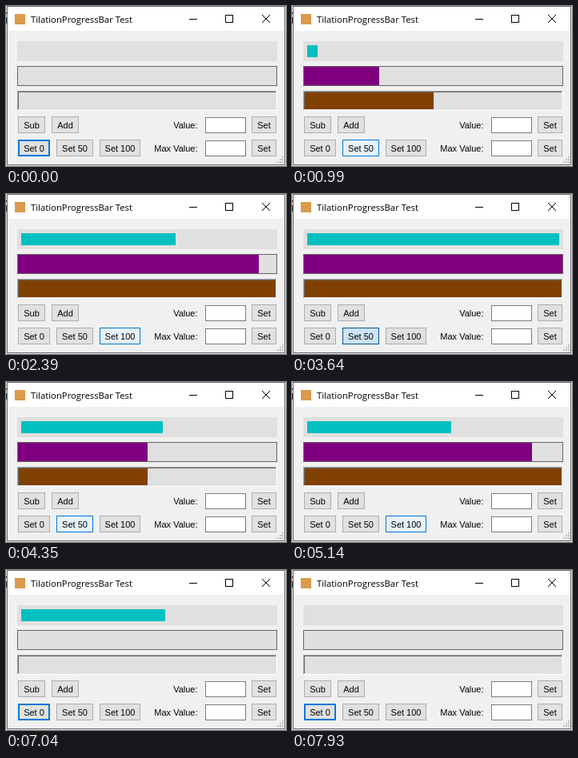
An HTML page with a canvas for the animation above (8.21 s loop, 350 px wide and 200 px high).

```html
<!DOCTYPE html>
<html lang="en">
<head>
<meta charset="utf-8">
<title>TilationProgressBar Test</title>
<style>
html, body { margin: 0; width: 100%; height: 100%; overflow: hidden; }
canvas { display: block; }
</style>
</head>
<body>
<canvas id="stage" width="350" height="200"></canvas>
<script>
const c = document.getElementById('stage').getContext('2d', { alpha: false });
const LOOP = 8210, TICK = 15.6, LAG = 8;
const UI = '11px "Liberation Sans", sans-serif';

// Mouse down, release (bars start moving), button and new value
const clicks = [
  { down: 910, up: 919, name: 'Set 50', value: 50 },
  { down: 2190, up: 2213, name: 'Set 100', value: 100 },
  { down: 3640, up: 3658, name: 'Set 50', value: 50 },
  { down: 4960, up: 5022, name: 'Set 100', value: 100 },
  { down: 6300, up: 6356, name: 'Set 0', value: 0 }
];
// Button under the mouse from each time on
const hovers = [
  [530, 'Set 50'], [1400, 'Set 100'], [3280, 'Set 50'],
  [4760, 'Set 100'], [5700, ''], [6070, 'Set 0'], [6900, '']
];
// Label, left, top, width
const buttons = [
  ['Sub', 15, 138, 34], ['Add', 57, 138, 34], ['Set', 307, 138, 31],
  ['Set 0', 15, 167, 40], ['Set 50', 63, 167, 46], ['Set 100', 117, 167, 51],
  ['Set', 307, 167, 31]
];

function rect(x, y, w, h, color) {
  c.fillStyle = color;
  c.fillRect(x, y, w, h);
}

function box(x, y, w, h, edge, fill, line = 1) {
  rect(x, y, w, h, edge);
  rect(x + line, y + line, w - 2 * line, h - 2 * line, fill);
}

function text(str, x, y, align, font = UI) {
  c.font = font;
  c.textAlign = align;
  c.fillStyle = '#000';
  c.fillText(str, x, y);
}

// One point per tick
function linear(from, to, ticks) {
  return from + Math.sign(to - from) * Math.min(ticks, Math.abs(to - from));
}

// A fifth of the remaining distance per tick, at least one point
function eased(from, to, ticks) {
  let left = Math.abs(to - from);
  for (let i = 0; i < ticks && left > 0; i++) left -= Math.max(1, Math.floor(left / 5));
  return to - Math.sign(to - from) * left;
}

function fill(x, y, w, h, value, color) {
  rect(x, y, Math.ceil(w * value / 100), h, color);
}

function drawWindow() {
  rect(0, 0, 350, 200, '#e6e6e6');
  rect(0, 8, 1, 2, '#303848');
  rect(0, 14, 1, 8, '#303848');
  box(1, 0, 348, 199, '#6a6a6a', '#f0f0f0');
  rect(2, 1, 346, 30, '#fff');
  rect(11, 10, 13, 13, '#dc9a4c');
  text('TilationProgressBar Test', 31, 20.5, 'left', '11.3px "Open Sans", sans-serif');

  rect(229, 16, 10, 1, '#000');
  box(274, 11, 10, 10, '#000', '#fff');
  c.strokeStyle = '#000';
  c.lineWidth = 1;
  c.beginPath();
  c.moveTo(320, 11); c.lineTo(330, 21);
  c.moveTo(330, 11); c.lineTo(320, 21);
  c.stroke();

  for (let row = 0; row < 3; row++)
    for (let i = 0; i <= row; i++) rect(345 - 3 * i, 188 + 3 * row, 2, 2, '#bfbfbf');

  ['Value:', 'Max Value:'].forEach((label, i) => {
    text(label, 239.5, 153 + 29 * i, 'right');
    box(249, 139 + 29 * i, 51, 20, '#7a7a7a', '#fff');
  });
}

function drawBars(t) {
  const n = clicks.filter(k => t >= k.up).length;
  const from = n > 1 ? clicks[n - 2].value : 0;
  const to = n ? clicks[n - 1].value : 0;
  const age = n ? t - clicks[n - 1].up : 0;

  rect(14, 44, 325, 25, '#e0e0e0');
  fill(19, 49, 315, 15, linear(from, to, Math.floor(age / TICK)), '#00c0c0');

  box(14, 75, 325, 25, '#646464', '#e0e0e0');
  fill(15, 76, 323, 23, eased(from, to, Math.floor((age - LAG) / TICK)), '#800080');

  rect(14, 106, 325, 25, '#fff');
  rect(14, 106, 324, 24, '#a0a0a0');
  rect(15, 107, 323, 23, '#e3e3e3');
  rect(15, 107, 322, 22, '#696969');
  rect(16, 108, 321, 21, '#e0e0e0');
  fill(16, 108, 321, 21, to, '#804000');
}

function drawButtons(t) {
  const click = clicks.filter(k => t >= k.down).pop();
  const hover = (hovers.filter(h => t >= h[0]).pop() || [0, ''])[1];
  const focus = click ? click.name : 'Set 0';
  const held = click && t < click.up ? click.name : '';

  for (const [name, x, y, w] of buttons) {
    if (name === held) box(x, y, w, 21, '#005499', '#cce4f7');
    else if (name === hover) box(x, y, w, 21, '#0078d7', '#e5f1fb');
    else if (name === focus) box(x, y, w, 21, '#0078d7', '#e1e1e1', 2);
    else box(x, y, w, 21, '#adadad', '#e1e1e1');
    text(name, x + w / 2, y + 15, 'center');
  }
}

const start = performance.now();
function frame() {
  const t = (performance.now() - start) % LOOP;
  drawWindow();
  drawBars(t);
  drawButtons(t);
  requestAnimationFrame(frame);
}
frame();
</script>
</body>
</html>
```
